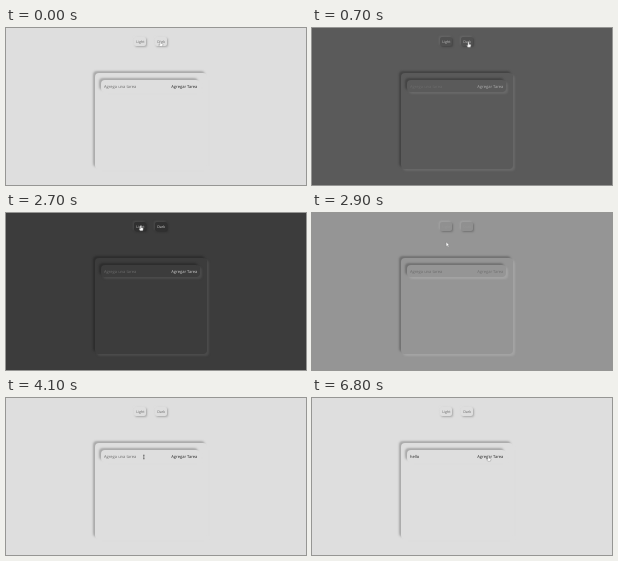
An HTML page that plays this animation: 300 by 157 pixels, repeating every 7.1 s.

```html
<!DOCTYPE html>
<html lang="es">
<head>
<meta charset="utf-8">
<title>Tareas</title>
<style>
  html, body { margin: 0; width: 100%; height: 100%; overflow: hidden; }
  body { position: relative; background: var(--bg); }
  div, svg { position: absolute; }
  .sunken { border-radius: 4px; box-shadow: -2px -2px 2px var(--lo), 2px 2px 2px var(--hi); }
  #column { left: 87px; top: 8px; width: 111px; height: 135px; background: #171717; }
  #panel { left: 89px; top: 45px; width: 112px; height: 96px; }
  #field { left: 95px; top: 52px; width: 99px; height: 12px; }
  .button {
    top: 9px; width: 12px; height: 9px; border-radius: 2px; background: var(--key);
    box-shadow: 1px 1px 2px var(--lo), -1px -1px 2px var(--hi);
  }
  .button.pressed { box-shadow: inset 1px 1px 1px var(--lo), inset -1px -1px 1px var(--hi); }
  svg { left: 0; top: 0; }
  text { font: 500 4.05px "Open Sans", sans-serif; fill: var(--ink); text-rendering: geometricPrecision; }
  .label { font-size: 3.6px; fill: var(--label); text-anchor: middle; }
  #cursor path { fill: #fff; stroke: #777; stroke-width: .4; stroke-linejoin: round; }
  #cursor #beam { fill: none; stroke: #444; stroke-width: .6; }
</style>
</head>
<body>
<div id="column"></div>
<div id="panel" class="sunken"></div>
<div id="field" class="sunken"></div>
<div class="button" style="left:128px"></div>
<div class="button" id="darkButton" style="left:149px"></div>
<svg width="300" height="157" viewBox="0 0 300 157">
  <text class="label" x="134.3" y="14.6">Light</text>
  <text class="label" x="155.2" y="14.6">Dark</text>
  <text id="entry" x="98" y="59.6"></text>
  <text x="165.3" y="59.7">Agregar Tarea</text>
  <rect id="caret" y="56" width=".5" height="4" fill="#222"/>
  <g id="cursor">
    <path id="hand" d="M-.6 .4Q0 -.5 .6 .4V2.2L2.2 2.6Q2.6 2.9 2.4 3.8L1.9 5.2H-.7L-1.8 3.5Q-1.6 2.9-.6 3.5Z"/>
    <path id="arrow" d="M0 0V4.5L1.1 3.5L2 5.2L2.7 4.8L1.9 3.2H3.2Z"/>
    <path id="beam" d="M-.8-1.8H.8M0-1.8V1.8M-.8 1.8H.8"/>
  </g>
</svg>
<script>
const LOOP = 7100, STEP = 100, FADE = 900;
const LIGHT = 222, DARK = 28;
const $ = id => document.getElementById(id);
const mix = (a, b, p) => a + (b - a) * p;
const gray = v => { v = Math.round(v); return `rgb(${v},${v},${v})`; };
const within = (t, a, b) => t >= a && t < b;
const show = (id, on) => $(id).style.display = on ? '' : 'none';

// CSS "ease", cubic-bezier(.25, .1, .25, 1), settled once the tail is invisible
function ease(x) {
  if (x <= 0) return 0;
  if (x > .72) return 1;
  let lo = 0, hi = 1, s;
  for (let i = 0; i < 24; i++) {
    s = (lo + hi) / 2;
    const at = .75 * s * (1 - s) ** 2 + .75 * s * s * (1 - s) + s ** 3;
    if (at < x) lo = s; else hi = s;
  }
  return .3 * s * (1 - s) ** 2 + 3 * s * s * (1 - s) + s ** 3;
}

// time, x, y of the pointer tip
const path = [
  [0, 154.5, 13.2], [100, 156.5, 14], [1500, 156.5, 14], [2100, 134.5, 12.5],
  [2700, 134.8, 12.5], [3100, 133.5, 45.5], [3400, 137.8, 59], [5700, 137.8, 59],
  [6000, 144.5, 59.5], [6100, 144.5, 59.5], [6800, 176.5, 58], [LOOP, 176.5, 58]
];
function pointer(t) {
  const i = path.findIndex(k => k[0] > t);
  const a = path[i - 1], b = path[i], p = (t - a[0]) / (b[0] - a[0]);
  return [mix(a[1], b[1], p), mix(a[2], b[2], p)];
}

const keyTimes = [4600, 4700, 5200, 5300, 5400];

function draw(t) {
  const dark = t < 2700 ? ease((t - 340) / FADE) : 1 - ease((t - 2575) / FADE);
  const bg = mix(LIGHT, DARK, dark);
  const colors = {
    bg, lo: bg * .76, hi: Math.min(bg + 15, LIGHT), key: mix(LIGHT, 14, dark),
    ink: mix(34, 240, dark), label: mix(100, 235, dark)
  };
  for (const name in colors)
    document.body.style.setProperty('--' + name, gray(colors[name]));
  show('column', within(t, 1000, 2700));
  $('darkButton').classList.toggle('pressed', within(t, 100, 400));

  const typed = 'hello'.slice(0, keyTimes.filter(k => k <= t).length);
  const entry = $('entry');
  entry.textContent = typed || 'Agrega una tarea';
  entry.style.fill = typed ? '' : '#6c6c6c';
  $('caret').setAttribute('x', 98 + (typed ? entry.getComputedTextLength() : 0));
  show('caret', within(t, 3500, 4100) || within(t, 4600, 5200) || within(t, 5800, 6300));

  const [x, y] = pointer(t);
  $('cursor').setAttribute('transform', `translate(${x} ${y})`);
  const shape = within(t, 3200, 6600) ? 'beam'
    : within(t, 1700, 2000) || within(t, 2800, 3200) ? 'arrow' : 'hand';
  for (const id of ['hand', 'arrow', 'beam']) show(id, id === shape);
}

const start = performance.now();
function tick() {
  const t = (performance.now() - start) % LOOP;
  draw(Math.floor(t / STEP) * STEP);
  requestAnimationFrame(tick);
}
tick();
</script>
</body>
</html>
```
